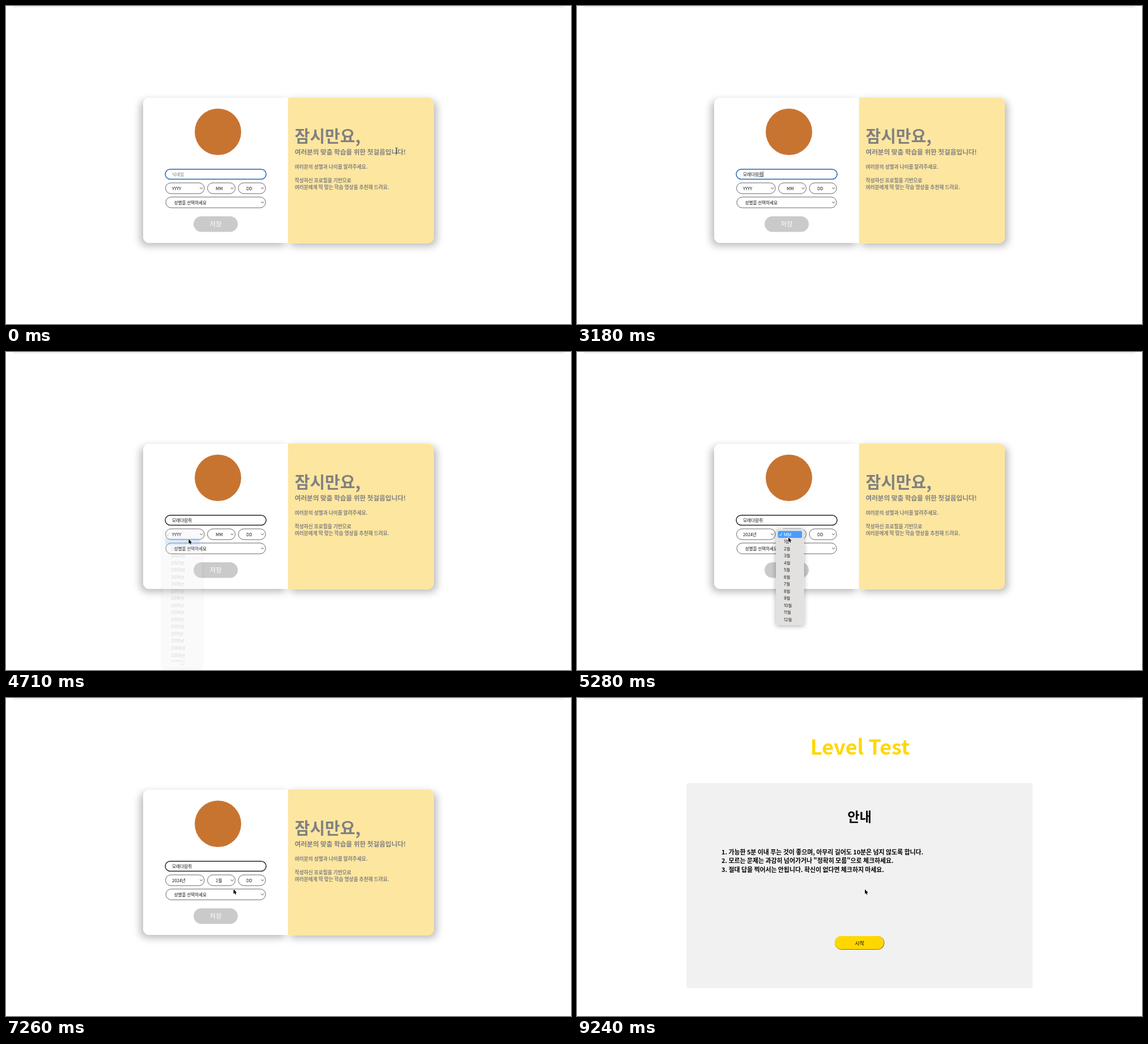
An HTML page with a canvas that plays this animation: 997 px wide and 561 px high, repeating every 9.72 s.

```html
<!DOCTYPE html>
<html lang="ko">
<head>
<meta charset="utf-8">
<title>프로필 입력</title>
<style>
html, body { margin: 0; width: 100%; height: 100%; overflow: hidden; background: #fff; }
canvas { display: block; width: 997px; height: 561px; }
</style>
</head>
<body>
<canvas id="stage"></canvas>
<script>
const LOOP = 9720, FADE = 220, ROW = 12.53;
const KOREAN = '"Noto Sans CJK KR", "Noto Sans KR", "Noto Sans CJK JP", "Noto Sans CJK", sans-serif';
const MENU_FONT = 'Inter, ' + KOREAN;
const canvas = document.getElementById('stage');
const ctx = canvas.getContext('2d');
const ratio = window.devicePixelRatio || 1;
canvas.width = 997 * ratio;
canvas.height = 561 * ratio;

// Keyboard states while the nickname is composed
const TYPED = 'ㅁ 모 몰 모래 모랟 모래다 모래달 모래다라 모래다람 모래다람ㅈ 모래다람주 모래다람쥐'.split(' ');
const TYPE_START = 1620, KEY_TIME = 120, BLUR = 3780, PAGE_CHANGE = 8800;

const numbered = (count, label) => Array.from({ length: count }, (_, i) => label(i));
const selects = [
  { x: 281.5, y: 312, w: 68.5, textX: 293, label: 'YYYY', value: '2024년', open: 3780, pick: 4530, set: 4800,
    menuX: 277, menuW: 68.5, bottom: 557, options: numbered(18, i => 2024 - i + '년') },
  { x: 355.5, y: 312, w: 49, textX: 370, label: 'MM', value: '1월', open: 5040, pick: 5850, set: 6120,
    menuX: 351, menuW: 49.5, bottom: 481.5, options: numbered(12, i => i + 1 + '월') },
  { x: 410, y: 312, w: 48, textX: 424, label: 'DD', value: '1일', open: 6400, pick: 6870, set: 7290,
    menuX: 405, menuW: 49.5, bottom: 557, options: numbered(18, i => i + 1 + '일') },
  { x: 282, y: 337, w: 176, textX: 296.5, label: '성별을 선택하세요', value: '여자', open: 7500, pick: 8100, set: 8400,
    menuX: 277, menuW: 178, bottom: 381, options: ['여자', '남자'] }
];

// Pointer stops: time, x, y
const PATH = [
  [3200, 560, 275], [3680, 317, 318], [4230, 317, 318], [4320, 318, 331], [4650, 318, 331],
  [5000, 372, 319], [5100, 372, 319], [5250, 373, 327], [5550, 373, 327], [5640, 374, 333],
  [6000, 374, 333], [6350, 428, 319], [6560, 428, 319], [6720, 428, 333], [7080, 428, 333],
  [7260, 401.5, 337.3], [7450, 369, 346], [7830, 369, 346], [7950, 369, 358], [8350, 369, 358],
  [8620, 371, 382], [9080, 371, 382], [9240, 508, 337.5]
];

function pointerAt(t) {
  const next = PATH.findIndex(stop => stop[0] > t);
  if (next < 1) return (next ? PATH[PATH.length - 1] : PATH[0]).slice(1);
  const [t0, x0, y0] = PATH[next - 1], [t1, x1, y1] = PATH[next];
  const p = (t - t0) / (t1 - t0), e = p * p * (3 - 2 * p);
  return [x0 + (x1 - x0) * e, y0 + (y1 - y0) * e];
}

function text(str, x, middle, size, color, weight = 500, align = 'left', family = KOREAN) {
  ctx.font = `${weight} ${size}px ${family}`;
  ctx.textAlign = align;
  ctx.fillStyle = color;
  ctx.fillText(str, x, middle + size * 0.37);
}

function box(x, y, w, h, radius, fill, stroke, lineWidth = 1) {
  ctx.beginPath();
  ctx.roundRect(x, y, w, h, radius);
  if (fill) { ctx.fillStyle = fill; ctx.fill(); }
  if (stroke) { ctx.strokeStyle = stroke; ctx.lineWidth = lineWidth; ctx.stroke(); }
}

// Shadow is kept outside the box so that it never shows through a fading one
function shadowBox(x, y, w, h, radius, fill, dx, dy, blur, alpha) {
  ctx.save();
  ctx.beginPath();
  ctx.rect(0, 0, 997, 561);
  ctx.roundRect(x, y, w, h, radius);
  ctx.clip('evenodd');
  ctx.shadowColor = `rgba(0,0,0,${alpha})`;
  ctx.shadowBlur = blur * ratio;
  ctx.shadowOffsetX = dx * ratio;
  ctx.shadowOffsetY = dy * ratio;
  box(x, y, w, h, radius, fill);
  ctx.restore();
  box(x, y, w, h, radius, fill);
}

function line(points, color, width) {
  ctx.beginPath();
  points.forEach(([x, y]) => ctx.lineTo(x, y));
  ctx.strokeStyle = color;
  ctx.lineWidth = width;
  ctx.stroke();
}

const chevron = (x, y, s) => line([[x - s, y - s / 2], [x, y + s / 2], [x + s, y - s / 2]], '#222', 0.9);

function drawCard() {
  const left = [242, 162, 255.5, 256, [11, 0, 0, 11], '#fff'];
  shadowBox(...left, -5, 5, 14, 0.28);
  shadowBox(497.5, 161.5, 257.5, 257, [0, 11, 11, 0], '#fde69f', 5, 5, 14, 0.28);
  box(...left);
  ctx.beginPath();
  ctx.arc(374, 222, 41, 0, 7);
  ctx.fillStyle = '#c87431';
  ctx.fill();
  const gray = '#808080';
  text('잠시만요,', 509.5, 230.3, 29, gray, 700);
  text('여러분의 맞춤 학습을 위한 첫걸음입니다!', 509.5, 257.6, 11.6, gray, 700);
  text('여러분의 성별과 나이를 알려주세요.', 509.5, 283.3, 8.7, gray, 700);
  text('작성하신 프로필을 기반으로', 509.5, 307.3, 8.7, gray, 700);
  text('여러분에게 딱 맞는 학습 영상을 추천해 드려요.', 509.5, 320.2, 8.7, gray, 700);
}

function drawNickname(t) {
  const focused = t < BLUR;
  box(281, 288, 178, 17.6, 8.8, '#fff', focused ? '#1f62b5' : '#222', 1.5);
  const key = Math.min(TYPED.length - 1, Math.floor((t - TYPE_START) / KEY_TIME));
  let caretX = 293;
  if (key < 0) {
    text('닉네임', 293, 296.7, 7.6, '#757575', 400);
  } else {
    const value = TYPED[key];
    text(value, 293, 296.7, 7.6, '#111');
    caretX += ctx.measureText(value).width;
    const start = 293 + ctx.measureText(value.slice(0, -1)).width;
    if (focused) line([[start, 301], [caretX, 301]], '#234', 0.9);
  }
  const blinkOn = key >= 0 || t % 1000 > 480 && t < 930 || t > 1400;
  if (focused && blinkOn) line([[caretX + 0.4, 291.5], [caretX + 0.4, 301.5]], '#222', 0.8);
}

function drawSelect(s, t) {
  box(s.x, s.y, s.w, 19, 9.5, '#fff', '#555', 0.9);
  text(t < s.set ? s.label : s.value, s.textX, s.y + 9.7, 7.6, '#111');
  chevron(s.x + s.w - 5.5, s.y + 9.5, 2.3);
}

function drawMenu(s, t, pointerY) {
  if (t < s.open || t >= s.pick + FADE) return;
  const { menuX: x, menuW: w, y, bottom } = s;
  const hovered = pointerY > y + 16 ? 1 : 0, long = bottom > 500;
  ctx.save();
  ctx.globalAlpha = Math.min(1, 1 - (t - s.pick) / FADE);
  shadowBox(x, y, w, bottom - y, 4, '#e3e1e0', 0, 2, 9, 0.32);
  if (long) chevron(x + w / 2, 551, 2.6);
  box(x + 3.5, y + 3.7 + hovered * ROW, w - 7, 12.4, 2.5, '#4a9cfb');
  ctx.beginPath();
  ctx.rect(x, y, w, (long ? 546.5 : bottom) - y);
  ctx.clip();
  [s.label, ...s.options].forEach((option, i) =>
    text(option, x + 14, y + 9.8 + i * ROW, 7.3, i === hovered ? '#fff' : '#222', 400, 'left', MENU_FONT));
  line([[x + 6.5, y + 10], [x + 8.3, y + 12.3], [x + 11, y + 7]], hovered ? '#222' : '#fff', 0.9);
  ctx.restore();
}

function drawForm(t, pointerY) {
  drawCard();
  drawNickname(t);
  selects.forEach(s => drawSelect(s, t));
  const ready = t >= selects[3].set;
  box(331, 371, 78, 27.5, 13.75, ready ? '#ffd700' : '#cacaca');
  text('저장', 370, 384.8, 11.6, '#fff', 500, 'center');
  selects.forEach(s => drawMenu(s, t, pointerY));
}

function drawGuide() {
  text('Level Test', 499.5, 86.5, 36.25, '#ffd700', 700, 'center');
  box(193, 150, 611, 362, 4, '#f1f1f1');
  text('안내', 498.5, 209, 23.2, '#000', 700, 'center');
  [
    '1. 가능한 5분 이내 푸는 것이 좋으며, 아무리 길어도 10분은 넘지 않도록 합니다.',
    '2. 모르는 문제는 과감히 넘어가거나 "정확히 모름"으로 체크하세요.',
    '3. 절대 답을 찍어서는 안됩니다. 확신이 없다면 체크하지 마세요.'
  ].forEach((row, i) => text(row, 255, 271.7 + i * 15.4, 10.88, '#000', 700));
  box(455, 420, 87.5, 24, 12, '#8c7600');
  box(455, 420, 86.6, 23, 11.5, '#ffd700');
  text('시작', 498.5, 432.3, 9, '#000', 500, 'center');
}

function drawPointer(x, y) {
  ctx.save();
  ctx.translate(x, y);
  ctx.beginPath();
  [[0, 0], [0, 8.3], [1.9, 6.6], [3.1, 9.4], [4.5, 8.8], [3.3, 6.1], [5.8, 6.1]]
    .forEach(([px, py]) => ctx.lineTo(px, py));
  ctx.closePath();
  ctx.strokeStyle = '#fff';
  ctx.lineWidth = 1.3;
  ctx.stroke();
  ctx.fillStyle = '#000';
  ctx.fill();
  ctx.restore();
}

function drawTextPointer(x, y) {
  line([[x, y - 4.5], [x, y + 4.5]], '#222', 1);
  for (const side of [-1, 1])
    line([[x - 2, y + 5 * side], [x, y + 4.3 * side], [x + 2, y + 5 * side]], '#222', 0.8);
}

function render(t) {
  ctx.setTransform(ratio, 0, 0, ratio, 0, 0);
  ctx.fillStyle = '#fff';
  ctx.fillRect(0, 0, 997, 561);
  ctx.fillStyle = '#dedede';
  ctx.fillRect(12, 1, 973, 1);
  const [x, y] = pointerAt(t);
  if (t < PAGE_CHANGE) drawForm(t, y);
  else drawGuide();
  if (t < TYPE_START) drawTextPointer(689, 255);
  else if (t >= PATH[0][0]) drawPointer(x, y);
}

const started = performance.now();
(function tick() {
  render((performance.now() - started) % LOOP);
  requestAnimationFrame(tick);
})();
</script>
</body>
</html>
```
